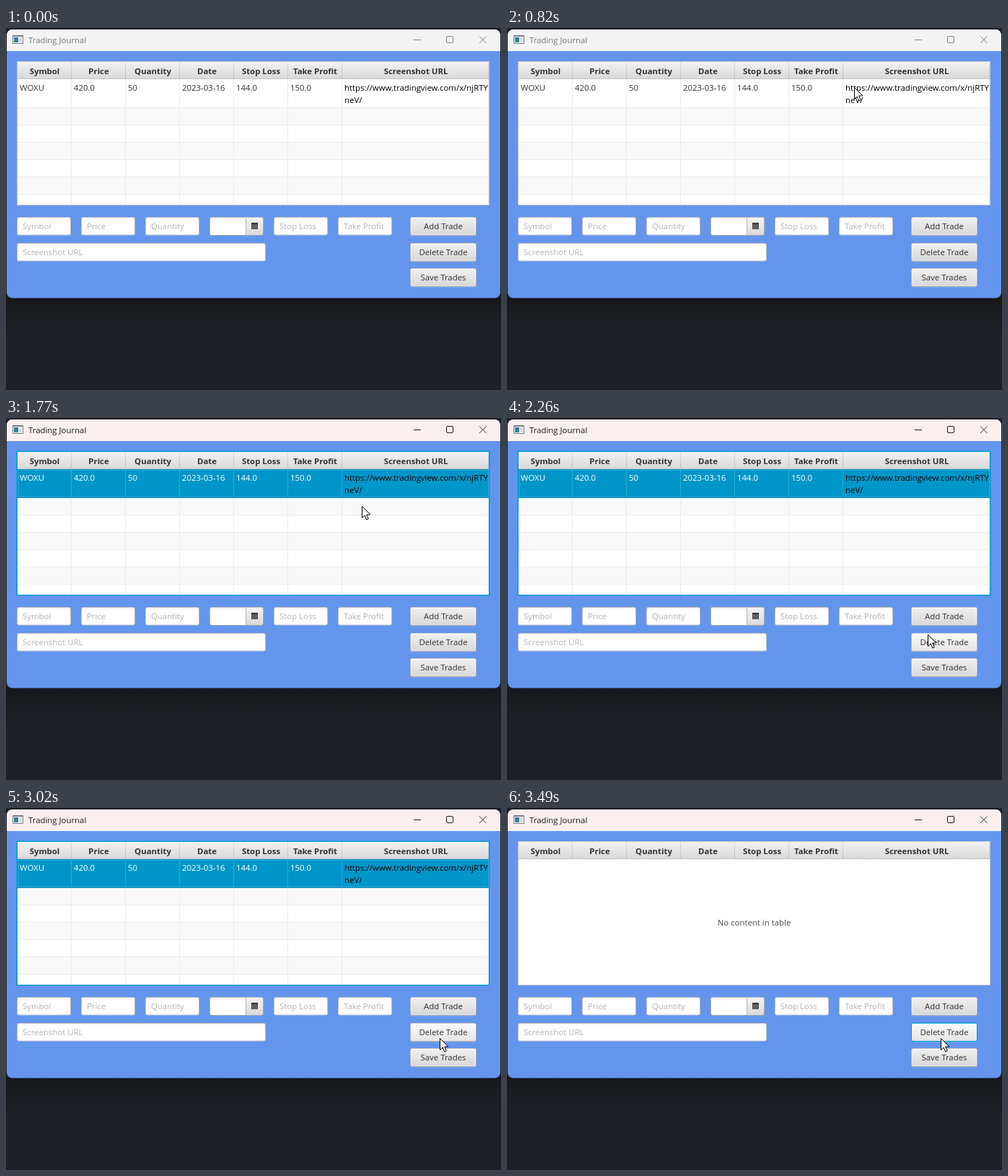
An HTML page with a canvas that plays this animation: 686x502 px, repeating every 4290 ms.

```html
<!DOCTYPE html>
<html lang="en">
<head>
<meta charset="utf-8">
<title>Trading Journal</title>
<style>
  html, body { margin: 0; width: 100%; height: 100%; overflow: hidden; background: #1f2025; }
  canvas { display: block; width: 686px; height: 502px; }
</style>
</head>
<body>
<canvas id="stage" width="686" height="502"></canvas>
<script>
const ctx = document.getElementById('stage').getContext('2d', { alpha: false });
const LOOP = 4290, SELECT = 1220, PRESS = 3360, RELEASE = 3490;
const FONT = '11.4px "Open Sans", "Noto Sans", sans-serif';
const BLUE = '#6495ed', FOCUS = '#039ed3';
const COLS = [15, 90, 165, 240, 315, 390, 465, 669];
const HEADS = ['Symbol', 'Price', 'Quantity', 'Date', 'Stop Loss', 'Take Profit', 'Screenshot URL'];
const CELLS = ['WOXU', '420.0', '50', '2023-03-16', '144.0', '150.0'];
const URL_LINES = ['https://www.tradingview.com/x/njRTY', 'neV/'];
const FIELDS = [
  [15, 262, 75, 'Symbol'], [104, 262, 75, 'Price'], [193, 262, 75, 'Quantity'],
  [371, 262, 75, 'Stop Loss'], [460, 262, 75, 'Take Profit'], [15, 298, 345, 'Screenshot URL']
];
const BUTTONS = [[262, 'Add Trade'], [298, 'Delete Trade'], [333, 'Save Trades']];

const easeOut = p => 1 - (1 - p) ** 2;
const easeIn = p => p * p;
const easeInOut = p => p * p * (3 - 2 * p);
const linear = p => p;

// Pointer moves: first step, last step, number of steps, from, to, easing
const MOVES = [
  [200, 680, 8, [613, 462], [490, 101], easeOut],
  [750, 820, 2, [490, 101], [481, 82], linear],
  [1560, 1700, 3, [481, 82], [489, 114], easeIn],
  [1770, 2260, 8, [489, 114], [583, 300], easeInOut],
  [2330, 2680, 6, [583, 300], [598, 345], easeOut],
  [2880, 3020, 3, [598, 345], [601, 319], easeOut]
];

function pointerAt(t) {
  let pos = null;
  MOVES.forEach(([t0, t1, n, a, b, ease], i) => {
    if (t < t0) return;
    const k = Math.min(n - 1, Math.floor((t - t0) / (t1 - t0) * (n - 1) + 1e-6));
    const p = ease(i ? (k + 1) / n : k / (n - 1));
    pos = [0, 1].map(j => Math.round(a[j] + (b[j] - a[j]) * p));
  });
  return pos;
}

function rect(x, y, w, h, fill) {
  ctx.fillStyle = fill;
  ctx.fillRect(x, y, w, h);
}

function round(x, y, w, h, r, fill) {
  ctx.fillStyle = fill;
  ctx.beginPath();
  ctx.roundRect(x, y, w, h, r);
  ctx.fill();
}

function frame(x, y, w, h, color) {
  ctx.strokeStyle = color;
  ctx.lineWidth = 1;
  ctx.strokeRect(x + .5, y + .5, w - 1, h - 1);
}

function fade(y0, y1, ...colors) {
  const g = ctx.createLinearGradient(0, y0, 0, y1);
  colors.forEach((c, i) => g.addColorStop(i / (colors.length - 1), c));
  return g;
}

function text(s, x, y, color, align = 'left', weight = '') {
  ctx.font = weight + ' ' + FONT;
  ctx.textAlign = align;
  ctx.fillStyle = color;
  ctx.fillText(s, x, y);
}

function line(color, ...pts) {
  ctx.strokeStyle = color;
  ctx.lineWidth = 1;
  ctx.beginPath();
  for (let i = 0; i < pts.length; i += 4) {
    ctx.moveTo(pts[i], pts[i + 1]);
    ctx.lineTo(pts[i + 2], pts[i + 3]);
  }
  ctx.stroke();
}

function drawWindow(t) {
  const active = t >= SELECT;
  const p = Math.max(0, Math.min(1, (t - SELECT) / 200));
  const mix = (a, b) => Math.round(a + (b - a) * p);
  rect(0, 0, 686, 502, '#1f2025');
  rect(0, 374, 686, 50, fade(374, 424, '#16171b', '#1b1c20', '#1f2025'));
  round(1, 2, 684, 372.5, 8, BLUE);
  round(1, 2, 684, 30, [8, 8, 0, 0], `rgb(${mix(243, 249)},${mix(243, 239)},${mix(243, 238)})`);

  round(9, 10, 15, 12, 1, '#777c82');
  rect(10, 12, 13, 9, '#f7f8f9');
  rect(11, 13, 6, 7, fade(13, 20, '#3d6f9c', '#3b8a80'));
  rect(18, 13, 4, 7, '#d3d8dc');

  text('Trading Journal', 31, 21, active ? '#1b1b1b' : '#767676');
  const ink = active ? '#1b1b1b' : '#858585';
  line(ink, 565, 16.5, 575, 16.5);
  ctx.beginPath();
  ctx.roundRect(610.5, 11.5, 9, 9, 1.5);
  ctx.stroke();
  line(active ? '#3a3a3a' : '#858585', 656, 11.5, 665.5, 21, 665.5, 11.5, 656, 21);
}

function drawRows(state) {
  const selected = state === 'selected', dim = state === 'dim';
  for (let i = 0; i < 7; i++) {
    const y = i ? 87 + 24 * i : 71;
    const h = Math.min(i ? 24 : 40, 245 - y);
    const first = i === 0;
    let fill = i % 2 ? '#f9f9f9' : '#ffffff', grid = '#ececec';
    if (first && selected) { fill = '#0096c9'; grid = '#2fa9d3'; }
    if (first && dim) { fill = '#d3d3d3'; grid = '#c6c6c6'; }
    rect(16, y, 653, h, fill);
    for (const x of COLS.slice(1, 7)) rect(x, y, 1, h, grid);
    rect(668, y, 1, h, grid);
    if (i < 6) rect(16, y + h - 1, 653, 1, first && selected ? '#0086b4' : grid);
  }
  if (selected) frame(17, 72, 652, 38, '#2fa9d3');
  CELLS.forEach((s, i) => text(s, COLS[i] + 4, 87, selected ? '#ffffff' : '#333333'));
  ctx.save();
  ctx.beginPath();
  ctx.rect(466, 71, 203, 40);
  ctx.clip();
  URL_LINES.forEach((s, i) => text(s, 469, 87 + 17 * i, '#000000'));
  ctx.restore();
}

function drawTable(t) {
  const focused = t >= SELECT && t < PRESS;
  if (focused) round(14.4, 45.4, 656.2, 201.2, 1, FOCUS);
  else rect(15, 46, 655, 200, '#c3c6cc');
  rect(16, 47, 653, 198, '#ffffff');
  rect(16, 47, 653, 24, fade(47, 71, '#f2f2f2', '#e5e5e5', '#d8d8d8'));
  rect(16, 70, 653, 1, '#c4c4c4');
  HEADS.forEach((s, i) => {
    const x = COLS[i], end = COLS[i + 1];
    text(s, (x + end) / 2 + 1, 64, '#333333', 'center', 'bold');
    rect(end - (i === 6 ? 1 : 0), 47, 1, 24, fade(47, 71, '#dcdcdc', '#bebebe'));
  });
  if (t >= RELEASE) text('No content in table', 342.5, 163, '#4a4a4a', 'center');
  else drawRows(t < SELECT ? 'plain' : focused ? 'selected' : 'dim');
}

function drawField([x, y, w, label]) {
  round(x, y, w, 25.5, 3, fade(y, y + 25, '#b4b6ba', '#c6c8cc'));
  round(x + 1, y + 1, w - 2, 23.5, 2, fade(y, y + 5, '#f1f1f1', '#ffffff'));
  text(label, x + 8, y + 17, '#b3b3b3');
}

function drawDatePicker() {
  round(282, 262, 75, 26, 3, fade(262, 288, '#b8b8b8', '#a4a4a4'));
  round(283, 263, 50, 24, [2, 0, 0, 2], fade(263, 268, '#f1f1f1', '#ffffff'));
  round(333, 263, 23, 24, [0, 2, 2, 0], fade(263, 287, '#f3f3f3', '#dadada'));
  rect(332, 263, 1, 24, '#b5b5b5');
  rect(340, 270, 9, 9, '#3c3c3c');
  for (let r = 0; r < 3; r++)
    for (let c = 0; c < 4; c++) rect(341 + 2 * c, 273 + 2 * r, 1, 1, '#c8c8c8');
}

function drawButton(y, label, hover, focus, pressed) {
  const body = pressed ? ['#d2d2d2', '#c6c6c6'] : hover ? ['#f9f9f9', '#e6e6e6'] : ['#efefef', '#d9d9d9'];
  round(560, y + 1, 92, 25.6, 3, 'rgba(255,255,255,.3)');
  if (focus) round(559.4, y - .6, 93.2, 27, 3.5, 'rgba(3,158,211,.35)');
  round(560, y, 92, 26, 3, focus ? FOCUS : fade(y, y + 26, '#bcbcbc', '#a9a9a9'));
  round(561, y + 1, 90, 24, 2, pressed ? '#dadada' : fade(y, y + 25, '#ffffff', '#e6e6e6'));
  round(562, y + 2, 88, 22, 2, fade(y + 2, y + 24, ...body));
  text(label, 606, y + 17, '#333333', 'center');
}

function drawPointer([x, y]) {
  ctx.save();
  ctx.translate(x + .5, y + .5);
  ctx.beginPath();
  ctx.moveTo(0, 0);
  for (const [px, py] of [[0, 16], [3.7, 12.6], [6.3, 18.5], [8.8, 17.4], [6.2, 11.6], [11.3, 11.4]])
    ctx.lineTo(px, py);
  ctx.closePath();
  ctx.fillStyle = '#ffffff';
  ctx.strokeStyle = '#000000';
  ctx.lineWidth = 1;
  ctx.fill();
  ctx.stroke();
  ctx.restore();
}

function draw(t) {
  const pos = pointerAt(t), pressed = t >= PRESS && t < RELEASE;
  drawWindow(t);
  drawTable(t);
  FIELDS.forEach(drawField);
  drawDatePicker();
  BUTTONS.forEach(([y, label], i) => {
    const over = pos && pos[0] >= 560 && pos[0] < 652 && pos[1] >= y && pos[1] < y + 26;
    drawButton(y, label, over, i === 1 && t >= PRESS, i === 1 && pressed);
  });
  if (pressed) {
    ctx.fillStyle = 'rgba(232,226,72,.7)';
    ctx.beginPath();
    ctx.arc(601, 320, 11, 0, Math.PI * 2);
    ctx.fill();
  }
  if (pos) drawPointer(pos);
}

const start = performance.now();
function tick() {
  draw((performance.now() - start) % LOOP);
  requestAnimationFrame(tick);
}
tick();
</script>
</body>
</html>
```
